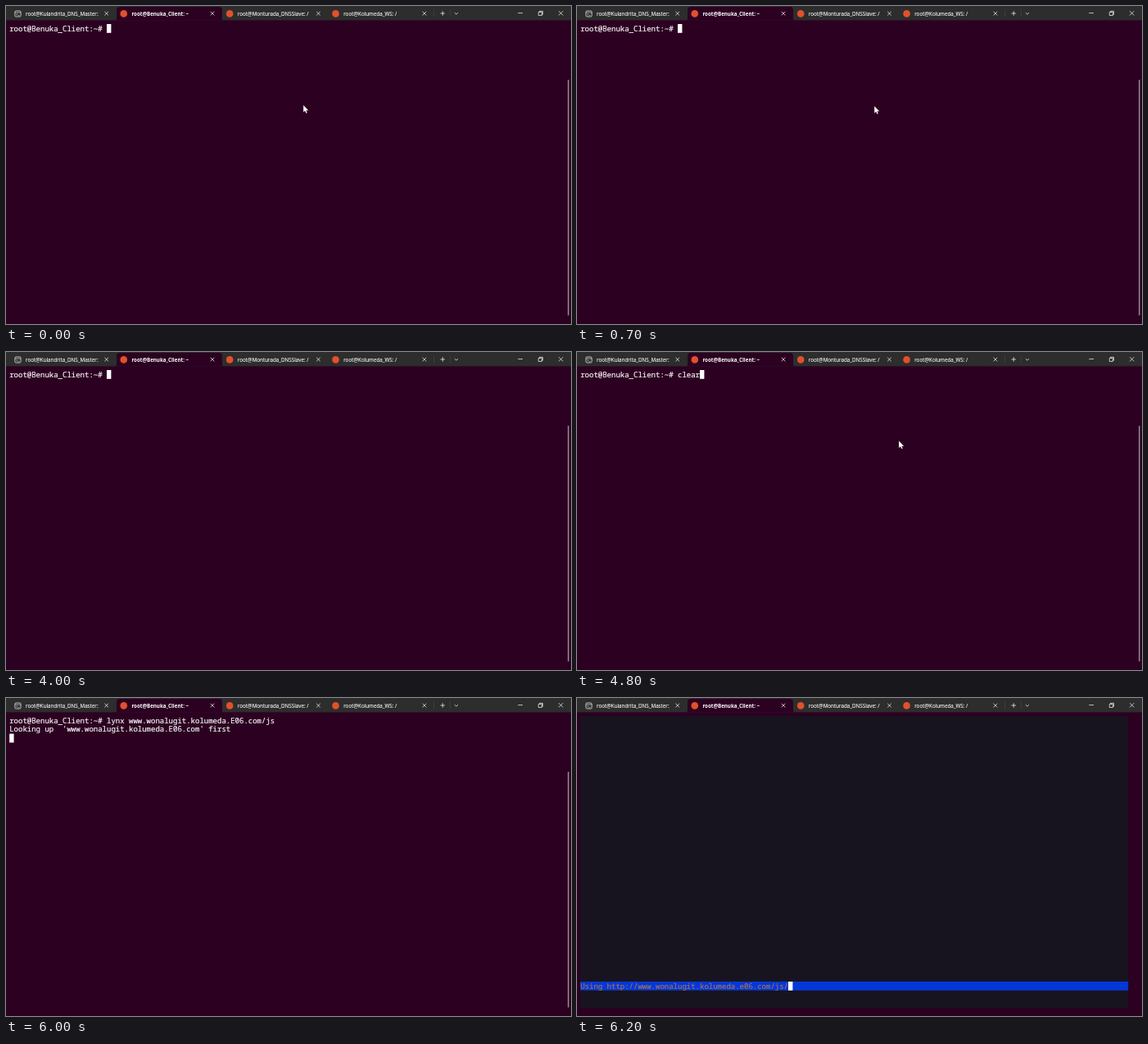
These frames come from a looping animation (690x388 px, 8 s). An HTML page:

```html
<!DOCTYPE html>
<html lang="en">
<head>
<meta charset="utf-8">
<title>Terminal</title>
<style>
html, body { margin: 0; width: 100%; height: 100%; overflow: hidden; background: #2c0021; }
svg { display: block; width: 100vw; height: 100vh; }
text { white-space: pre; }
.tab { font: 400 6.28px "Open Sans", "Noto Sans", sans-serif; fill: #fff; stroke: #fff; stroke-width: .1; }
.tab.on { font-weight: 700; font-size: 6.2px; stroke: none; }
.mono { font: 500 9px "Noto Sans Mono", "DejaVu Sans Mono", monospace; fill: #f6f2f5; stroke: #f6f2f5; stroke-width: .2; }
.mono.status { fill: #a2734c; stroke: #a2734c; }
.line { fill: none; stroke: #f2f2f2; stroke-width: .75; }
.sep { stroke: #494949; stroke-width: .6; }
</style>
</head>
<body>
<svg viewBox="0 0 690 388">
  <rect width="690" height="388" fill="#2c0021"/>
  <rect width="690" height="17.4" fill="#2d2d2d"/>
  <path d="M132.5 17.5Q135 17.5 135 15V5Q135 1 139 1H260Q264 1 264 5V15Q264 17.5 266.5 17.5Z" fill="#2c0021"/>
  <g id="tabs"></g>
  <rect class="line" x="10.9" y="6" width="7.2" height="7" rx="1.4"/>
  <path class="line" d="M11 8H18M12.6 9.5L13.8 10.4L12.6 11.3M14.7 11.4H16.4" style="stroke-width:.6"/>
  <path class="sep" d="M522.5 4.5V13.5M542.5 4.5V13.5"/>
  <path class="line" d="M530.5 9H536M533.25 6.25V11.75M547.8 8.2L549.9 10.2L552 8.2"/>
  <path class="line" d="M625.3 8.6H631M675 6.2L680.2 11.4M680.2 6.2L675 11.4"/>
  <path class="line" d="M651.5 7.4V6.3H655.5V10.3H654.4M650.3 7.5H654.3V11.5H650.3Z"/>
  <rect id="bar" x="686.1" y="90" width="1.3" height="287.5" rx=".6" fill="#a99ba6"/>
  <g id="page">
    <rect x="4" y="22" width="669.2" height="356.4" fill="#171420"/>
    <rect x="4" y="346" width="669.2" height="10.8" fill="#0437da"/>
  </g>
  <g id="rows"></g>
  <rect id="caret" width="5.4" height="10.8" fill="#fff"/>
  <path id="mouse" d="M0 0V9L2 7.2L3.4 10.1L4.9 9.4L3.6 6.7H6.4Z" fill="#fff" stroke="#120010" stroke-width=".25"/>
</svg>
<script>
const LOOP = 8000, CELL = 5.4, ROW = 10.8, LEFT = 4.2, TOP = 22;
const $ = id => document.getElementById(id);
const host = 'www.wonalugit.kolumeda.E06.com';
const prompt = 'root@Benuka_Client:~# ';

function add(parent, name, attrs, text = '') {
  const el = document.createElementNS('http://www.w3.org/2000/svg', name);
  for (const key in attrs) el.setAttribute(key, attrs[key]);
  el.textContent = text;
  return parent.appendChild(el);
}

const titles = [
  'root@Kulandrita_DNS_Master:',
  'root@Benuka_Client: ~',
  'root@Monturada_DNSSlave: /',
  'root@Kolumeda_WS: /'
];
titles.forEach((title, i) => {
  const x = 24 + i * 129.4;
  add($('tabs'), 'text', { class: i === 1 ? 'tab on' : 'tab', x, y: 12.2 }, title);
  if (i) add($('tabs'), 'circle', { cx: x - 9.6, cy: 9.4, r: 4.3, fill: '#e2502b' });
  const c = x + 98.7;
  add($('tabs'), 'path', { class: 'line', d: `M${c - 2.3} 6.8l4.6 4.6m0 -4.6l-4.6 4.6` });
});

const rows = [0, 1, 30].map(n =>
  add($('rows'), 'text', { class: n === 30 ? 'mono status' : 'mono', x: LEFT, y: TOP + n * ROW + 8.6 }));

// Each screen: start time, three text rows, caret row
const lynx = prompt + 'lynx ' + host + '/js';
const screens = [
  [0, [prompt, '', ''], 0],
  [4800, [prompt + 'clear', '', ''], 0],
  [5500, [lynx, '', ''], 0],
  [6000, [lynx, `Looking up  '${host}' first`, ''], 2],
  [6100, ['', '', `Using http://${host.replace('E', 'e')}/js/`], 30]
];

// Pointer stops: start time, x, y; without a place it is hidden
const stops = [
  [0, 363.1, 120.8], [200, 363.1, 121.1], [400, 363.1, 121.5], [700, 363.1, 121.9],
  [4000], [4200, 393, 108.2], [6000]
];

const at = (list, t) => list.filter(item => item[0] <= t).pop();
const show = (el, on) => el.setAttribute('visibility', on ? 'visible' : 'hidden');

function draw(t) {
  const [, lines, row] = at(screens, t);
  lines.forEach((line, i) => { if (rows[i].textContent !== line) rows[i].textContent = line; });
  const col = row === 0 ? lines[0].length : row === 30 ? lines[2].length : 0;
  $('caret').setAttribute('x', LEFT + col * CELL);
  $('caret').setAttribute('y', TOP + row * ROW);
  show($('page'), row === 30);
  show($('bar'), row !== 30);

  const [, x, y] = at(stops, t);
  show($('mouse'), x !== undefined);
  if (x !== undefined) $('mouse').setAttribute('transform', `translate(${x} ${y})`);
}

const start = performance.now();
function tick() {
  draw((performance.now() - start) % LOOP);
  requestAnimationFrame(tick);
}
tick();
</script>
</body>
</html>
```
